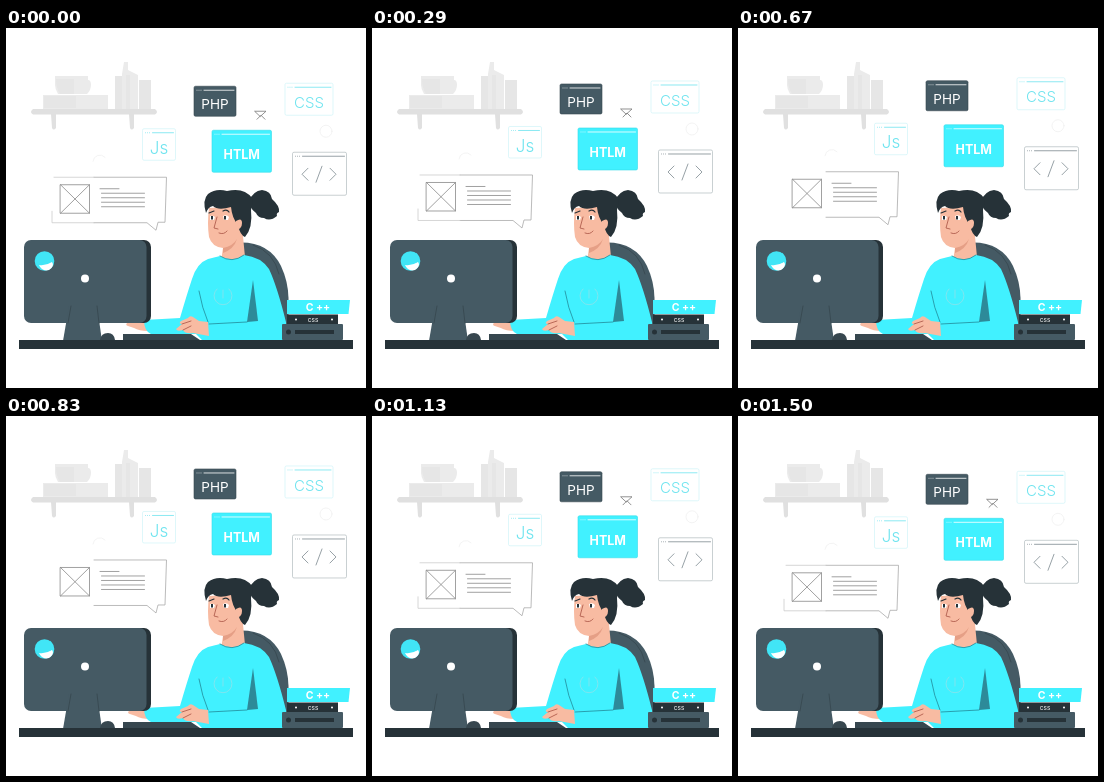
These frames come from a looping animation (360 by 360 pixels, 1.54 s). An HTML page:

```html
<!DOCTYPE html>
<html lang="en">
<meta charset="utf-8">
<title>Developer at her desk</title>
<style>
  html, body { margin: 0; height: 100%; overflow: hidden; background: #fff; }
  svg { display: block; width: 100vw; height: 100vh; }
  text { font-family: Inter, sans-serif; text-anchor: middle; }
  .line { fill: none; stroke-width: .8; stroke-linecap: round; stroke-linejoin: round; }
</style>
<svg viewBox="0 0 360 360">
  <g id="shelf" fill="#e6e6e6">
    <path fill="#e0e0e0" d="M27 81H149Q153 84 149 86.500H27Q23 84 27 81zM45 86h5v14q-2.500 3-4 0zM123 86h5v14q-2.500 3-4 0z"/>
    <path fill="#ebebeb" d="M49 48h33v4q3 0 3 5t-4 9H52q-3-5-3-9z"/>
    <path d="M50 51h18v15H54q-4-6-4-15z"/>
    <path fill="#ebebeb" d="M37 67h65v14H37z"/>
    <path d="M38 68h32v12H38zM109 48h7v33h-7zM133 52h12v29h-12z"/>
    <path fill="#ebebeb" d="M118 34h4v8l10 5v34h-16V46z"/>
    <path d="M120 47h4v34h-4z"/>
  </g>

  <g id="floating">
    <g class="line" stroke="#f0f0f0">
      <path d="M87 130a7 7 0 0 1 12-4"/>
      <circle cx="320" cy="100" r="6"/>
    </g>
    <g id="windows"></g>
    <path class="line" stroke="#7d8a90" d="M302 137l-6 6 6 6M324 137l6 6-6 6M316 135l-6 16"/>
    <path id="mail" class="line" stroke="#777" d="M249 80h11l-5.500 5zM251 88l4-4 4 4"/>

    <g class="line" stroke="#8a8a8a">
      <path stroke="#aaa" d="M88 146H160.500L159 191H152L150 199L141 191.500H88"/>
      <path id="bubbleEnd" stroke="#ccc" d="M88 146H48M46 180V191.500H88"/>
      <path d="M54.500 153.500h29v28.500h-29zl29 28.500m0-28.500l-29 28.500"/>
      <path d="M94 157.500h19M95.500 162h43m-43 4.500h43m-43 4.500h43m-43 4.500h43"/>
    </g>
  </g>

  <g id="chair">
    <path fill="#455a64" d="M234 214.500Q263 214 275 238Q282 253 282.500 270V312H235z"/>
    <path class="line" stroke="#37474f" d="M247 217Q268 224 273 246"/>
  </g>

  <g id="woman">
    <path fill="#263238" d="M243 173Q247 163 256 162Q265 163 266 171Q274 178 273 184Q270 185 271 188Q264 194 258 190Q252 190 250 185Q246 182 244 178z"/>
    <path fill="#f8bba2" d="M203 180Q201 195 203 209Q206 219 217 220L215 233Q228 241 239 229L236 198V178z"/>
    <path fill="#e59f86" d="M217 220Q227 218 231 211Q228 221 217 225z"/>
    <path fill="#263238" d="M200 185Q196 172 202 166Q210 160 221 163Q238 159 246 170Q247 176 245 182Q247 200 239 209Q234 207 232 197Q226 190 225 179Q212 183 207 178Q202 179 200 185z"/>
    <path fill="#f8bba2" d="M230 193q6-4 6 2t-6 7z"/>
    <path fill="#fff" d="M204 188q3-1 5 1l-1 3h-4zM217 188q4-2 6 1l-1 3h-4z"/>
    <g class="line" stroke="#263238">
      <path d="M203 185l5-2M217 183q4-2 6 1" stroke-width="1.200"/>
      <path stroke="#a95345" d="M211 189l-3 11 4 1M213 205q5 2 8-2"/>
    </g>
    <path fill="#263238" d="M205 188h2v3.500h-2zM218 188h2v3.500h-2z"/>

    <path id="fingers" fill="#f8bba2" d="M143 291L132 293L122 295Q120 297 123 298L129 300Q134 303 143 303z"/>
    <path fill="#41f1ff" d="M214 228Q226 235 238 227Q255 229 263 241Q271 258 280 294Q281 305 277 312H196L190 306H145Q138 303 138 292L174 290Q181 266 186 251Q191 235 202 231z"/>
    <path fill="#2d8a99" d="M247 252L252 293L241 294z"/>
    <path class="line" stroke="#238b9a" d="M193 263Q196 280 202 294M241 294L203 296M214 228Q226 236 238 227"/>
    <path fill="#f8bba2" d="M202 294L193 293L187 289Q184 287 182 290L175 293Q172 296 176 296L170 301Q171 304 177 302Q179 306 187 305L203 308z"/>
    <path class="line" stroke="#a95345" d="M176 296l9-3M177 302l8-4"/>
    <path class="line" stroke="#8fe3ea" d="M211 261A9 9 0 1 0 223 261M217 262V270"/>
  </g>

  <g id="desk">
    <rect x="22" y="212" width="123" height="83" rx="7" fill="#263238"/>
    <rect x="18" y="212" width="122.500" height="83" rx="7" fill="#455a64"/>
    <path fill="#455a64" d="M63 278H91L96 313H57z"/>
    <path class="line" stroke="#37474f" d="M62 295L65 278M93 295L91 278"/>
    <circle cx="79" cy="250.500" r="4" fill="#fff"/>
    <circle cx="38.500" cy="233" r="9.800" fill="#41e5f6"/>
    <path fill="#fff" d="M33 237Q40 238 46 234Q49 238 43 242Q36 244 33 237z"/>
    <path fill="#37474f" d="M94 312Q95 305 102 305Q108 305 109 312zM117 306H185L194 312H117z"/>
    <rect x="13" y="312" width="334" height="9" fill="#263238"/>
  </g>

  <g id="books" fill="#fff">
    <path fill="#41f1ff" d="M281 272H344L342.500 286H281z"/>
    <text x="312" y="283" font-size="10.500" font-weight="700">C ++</text>
    <rect x="281" y="286.500" width="51" height="9.500" fill="#263238"/>
    <circle cx="290" cy="291.500" r="1"/>
    <circle cx="326" cy="291.500" r="1"/>
    <text x="307" y="293.500" font-size="5.200" font-weight="500">CSS</text>
    <rect x="276" y="296" width="61" height="16" rx="1" fill="#455a64"/>
    <rect x="289" y="302" width="39" height="4" fill="#263238"/>
    <circle cx="282.500" cy="304" r="2.500" fill="#263238"/>
  </g>
</svg>
<script>
  const LOOP = 1540, SWING = 2.8, REST = .5;
  const el = id => document.getElementById(id);

  const panel = (x, y, w, h, fill, edge, ink, label = '', size = 0, weight = 400) => `
    <rect x="${x}" y="${y}" width="${w}" height="${h}" rx="1.500" fill="${fill}" stroke="${edge}" stroke-width=".6"/>
    <path class="line" stroke="${ink}" stroke-width=".7" d="M${x + 10} ${y + 4}H${x + w - 2}"/>
    <path class="line" stroke="${ink}" stroke-width="1.200" stroke-dasharray="0 2" d="M${x + 3} ${y + 4}h5"/>
    <text x="${x + w / 2}" y="${y + h / 2 + 3.3 + size * .36}" fill="${ink}" font-size="${size}" font-weight="${weight}">${label}</text>`;

  el('windows').innerHTML =
    panel(188, 55, 42, 30, '#455a64', '#37474f', '#fff', 'PHP', 13.5) +
    panel(279, 52, 48, 32, '#fff', '#c8f2f6', '#6fe4ef', 'CSS', 15, 300) +
    panel(136.5, 97.5, 33, 31.5, '#fff', '#c8f2f6', '#6fe4ef', 'Js', 17, 300) +
    panel(206, 99, 59.5, 42, '#41f1ff', '#35dcea', '#fff', 'HTLM', 12.5, 700) +
    panel(286.500, 121, 54, 43, '#fff', '#a5b0b4', '#7d8a90');

  function draw(now) {
    const t = now % LOOP;
    const wave = Math.cos(2 * Math.PI * (t + 50) / LOOP);
    const low = t < 400 || t > 1050;
    el('floating').setAttribute('transform', `translate(0 ${REST + SWING * wave})`);
    el('mail').style.opacity = low ? 1 : 0;
    el('bubbleEnd').style.opacity = low ? 1 : 0;
    el('fingers').setAttribute('transform', `translate(${-wave} 0)`);
    requestAnimationFrame(draw);
  }
  draw(performance.now());
</script>
</html>
```
